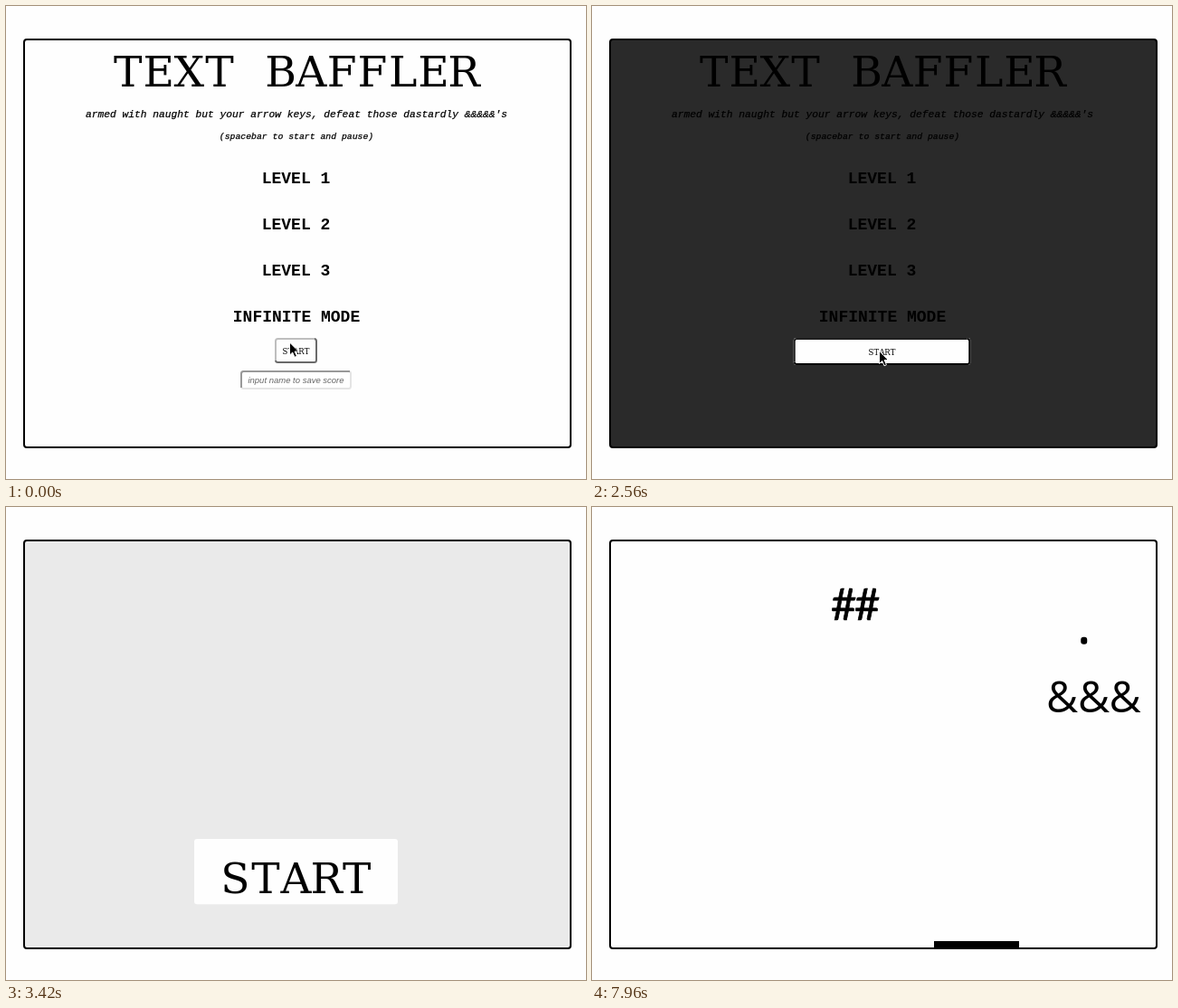
An HTML page that plays this animation: 641x523 px, repeating every 8 s.

```html
<!DOCTYPE html>
<html lang="en">
<head>
<meta charset="utf-8">
<title>Text Baffler</title>
<style>
html, body { margin: 0; width: 100%; height: 100%; overflow: hidden; background: #fefefe; }
svg { display: block; width: 641px; height: 523px; }
text { text-anchor: middle; white-space: pre; }
.mono { font-family: "Liberation Mono", monospace; }
.slab { font-family: "DejaVu Serif", serif; }
.it { font-style: italic; stroke: #000; stroke-width: .25; }
.bold { font-weight: bold; font-size: 18px; }
.hint { font: italic 9.5px "Liberation Sans", sans-serif; fill: #666; }
.foe { font-size: 49px; text-anchor: start; }
.hash { font-family: Lato, sans-serif; stroke: #000; stroke-width: .7; }
.amp { font-family: "Open Sans", sans-serif; font-size: 48px; }
.edge { fill: none; stroke-width: 2; }
</style>
</head>
<body>
<svg viewBox="0 0 641 523">
  <rect width="641" height="523" fill="#fefefe"/>
  <rect id="board" x="20" y="37" width="604" height="451" rx="3" stroke="#000" stroke-width="2"/>

  <g id="menu" class="mono">
    <text id="title" y="88.5" class="slab">TEXT BAFFLER</text>
    <text x="321" y="122.5" font-size="11.25" class="it">armed with naught but your arrow keys, defeat those dastardly &amp;&amp;&amp;&amp;&amp;'s</text>
    <text x="321" y="146.5" font-size="9.8" class="it">(spacebar to start and pause)</text>
    <text x="320.5" y="196" class="bold">LEVEL 1</text>
    <text x="320.5" y="247" class="bold">LEVEL 2</text>
    <text x="320.5" y="298" class="bold">LEVEL 3</text>
    <text x="321" y="349" class="bold">INFINITE MODE</text>
  </g>

  <g id="field">
    <rect x="260" y="404" width="121" height="19" rx="2.5" fill="#fff" stroke="#e4e4e4" stroke-width="2"/>
    <path class="edge" d="M260 422V406.5Q260 404 262.5 404H380" stroke="#999"/>
    <text x="320.5" y="417" class="hint">input name to save score</text>
  </g>

  <g id="button">
    <rect id="face" y="367" rx="3" fill="#fefefe"/>
    <g id="bevel">
      <path id="dark" class="edge"/>
      <path id="light" class="edge"/>
    </g>
    <text id="label" class="slab">START</text>
  </g>

  <g id="game">
    <text class="foe hash" x="264 290" y="125">##</text>
    <text class="foe amp" x="502 537 571.5" y="227">&amp;&amp;&amp;</text>
    <rect id="ball" width="7" height="8" rx="3"/>
    <rect id="paddle" y="480" width="94" height="8"/>
  </g>

  <path id="cursor" d="M0 0V14L3.2 11 5.5 16.3 7.9 15.2 5.6 10H10Z" stroke="#fff" stroke-width="1"/>
</svg>
<script>
const LOOP = 8000, CLICK = 2188, DARK = 2886, PLAY = 3701;
const TOP = 367, MIDDLE = 320.5;
const $ = id => document.getElementById(id);
const clamp = v => Math.max(0, Math.min(1, v));
const show = (id, on) => $(id).setAttribute("display", on ? "inline" : "none");
const set = (id, attrs) => {
  for (const k in attrs) $(id).setAttribute(k, attrs[k]);
};
const gray = v => { const n = Math.round(v); return `rgb(${n},${n},${n})`; };

// Typewriter setting: slab letters centred in equal cells of .6 em
function typeset(id, size) {
  const n = $(id).textContent.length;
  const x = Array.from({ length: n }, (_, i) => MIDDLE + (i - (n - 1) / 2) * size * .6);
  set(id, { x: x.join(" "), "font-size": size * .84 });
}

// The standard "ease" curve: cubic-bezier(.25, .1, .25, 1)
function ease(x) {
  if (x <= 0 || x >= 1) return clamp(x);
  const bez = (a, b, s) => 3 * a * s * (1 - s) ** 2 + 3 * b * s * s * (1 - s) + s ** 3;
  let lo = 0, hi = 1;
  for (let i = 0; i < 24; i++) {
    const mid = (lo + hi) / 2;
    if (bez(.25, .25, mid) < x) lo = mid; else hi = mid;
  }
  return bez(.1, 1, lo);
}

// Waypoints: time, then coordinates
const ballPath = [
  [3701, 281, 476], [3790, 249, 471], [4410, 27.5, 296], [4600, 95, 236],
  [5030, 259, 99], [5450, 124, 232], [5840, 27.5, 329], [6120, 95.5, 397],
  [6470, 180, 478], [7150, 343, 330], [7960, 543.5, 148], [8000, 553, 139]
];
const paddlePath = [
  [3701, 190], [3790, 159], [4080, 21], [4560, 21], [4600, 34], [5244, 219],
  [5290, 326], [5330, 326], [5450, 146], [5800, 57], [6240, 57], [6300, 84],
  [6470, 132], [7150, 367], [7210, 378], [8000, 378]
];

function along(path, t) {
  if (t <= path[0][0]) return path[0].slice(1);
  const i = path.findIndex(p => p[0] > t);
  if (i < 0) return path[path.length - 1].slice(1);
  const [a, b] = [path[i - 1], path[i]];
  const u = (t - a[0]) / (b[0] - a[0]);
  return a.slice(1).map((v, k) => v + (b[k + 1] - v) * u);
}

function drawButton(t, fade, grow) {
  const w = 47 + 178 * fade, x = MIDDLE - w / 2;
  const size = 10.1 + 49.9 * grow;
  const lift = t < CLICK ? 2 : 0;
  const h = 30 + .92 * (size - 10.1) - lift;
  const l = x + 1, r = x + w - 1, top = TOP + 1, bot = TOP + h - 1, c = 2.5;
  set("face", { x, width: w, height: h });
  set("dark", {
    d: `M${l} ${bot - c}Q${l} ${bot} ${l + c} ${bot}H${r - c}Q${r} ${bot} ${r} ${bot - c}` +
       `V${top + c}Q${r} ${top} ${r - c} ${top}`,
    stroke: gray(106 * clamp(1 - fade * 2.1))
  });
  set("light", {
    d: `M${l} ${bot - c}V${top + c}Q${l} ${top} ${l + c} ${top}H${r - c}`,
    stroke: gray(190 * (1 - fade))
  });
  show("bevel", t < DARK);
  set("label", { y: 376.6 + .905 * size - lift / 2 });
  typeset("label", size);
}

function draw(t) {
  const fade = ease((t - CLICK) / (DARK - CLICK));
  const grow = ease((t - DARK) / (PLAY - DARK));
  const playing = t >= PLAY;

  set("board", { fill: gray(254 * (t < DARK ? 1 - fade : grow)) });
  show("menu", t < DARK);
  show("field", t < CLICK);
  show("button", !playing);
  show("game", playing);
  show("cursor", t < DARK);

  if (playing) {
    const [bx, by] = along(ballPath, t);
    set("ball", { x: bx - 3.5, y: by - 4 });
    set("paddle", { x: along(paddlePath, t)[0] });
  } else {
    drawButton(t, fade, grow);
    const [cx, cy] = t < 480 ? [313.5, 372] : t < 570 ? [315.5, 377] : [317.5, 381.5];
    set("cursor", { transform: `translate(${cx} ${cy})` });
  }
}

typeset("title", 56.25);
const begin = performance.now();
function tick() {
  draw((performance.now() - begin) % LOOP);
  requestAnimationFrame(tick);
}
tick();
</script>
</body>
</html>
```
